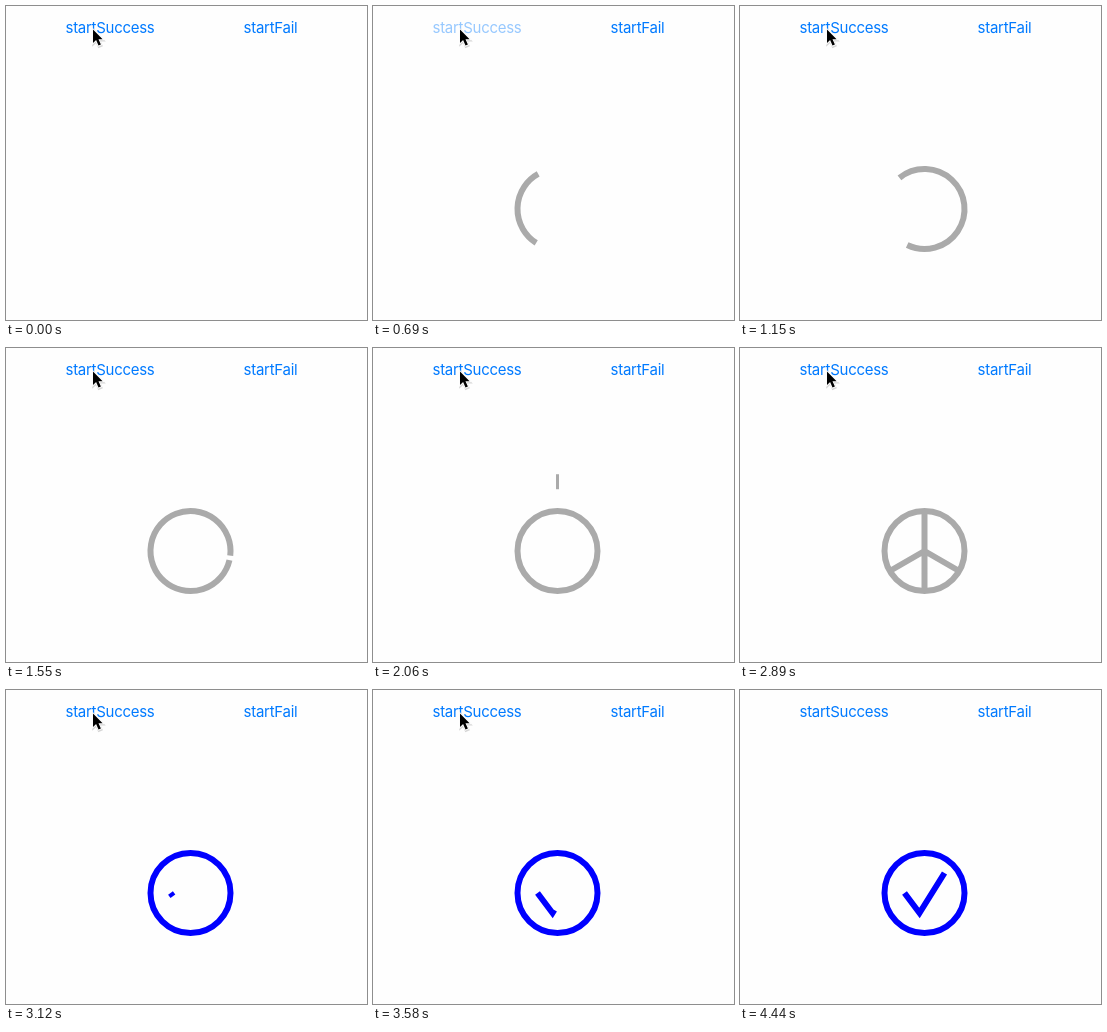
These frames come from a looping animation (361x314 px, 5.46 s). An HTML page:

```html
<!DOCTYPE html>
<html lang="en">
<head>
<meta charset="utf-8">
<title>Loading indicator</title>
<style>
  html, body { margin: 0; width: 100%; height: 100%; overflow: hidden; background: #fefefe; }
  svg { display: block; width: 361px; height: 314px; }
  text { font: 15px Inter, Roboto, sans-serif; letter-spacing: -.28px; fill: #007aff; text-anchor: middle; }
  .line { fill: none; stroke: #aaa; stroke-width: 6; }
  .thin { stroke-width: 3; }
  .blue { stroke: #00f; }
</style>
</head>
<body>
<svg viewBox="0 0 361 314">
  <text id="success" x="104" y="26.6">startSuccess</text>
  <text x="264.5" y="26.6">startFail</text>
  <path id="ring" class="line"/>
  <path id="mover" class="line thin"/>
  <path id="drop" class="line thin"/>
  <path id="spokes" class="line"/>
  <path id="check" class="line blue" stroke-miterlimit="10"/>
  <g id="cursor">
    <path d="M0 0V13.6L3.1 10.7L5.5 16.2L7.9 15.2L5.5 9.9H9.6Z" transform="translate(.4 1)"
      fill="none" stroke="#000" stroke-opacity=".16" stroke-width="2.4"/>
    <path d="M0 0V13.6L3.1 10.7L5.5 16.2L7.9 15.2L5.5 9.9H9.6Z"
      stroke="#fff" stroke-width="1.8" paint-order="stroke"/>
  </g>
</svg>
<script>
const LOOP = 5460, CX = 184.5, CY = 203, R = 40, BASE = CY + R + 3;

// Stage boundaries in ms
const PRESS = 510, RELEASE = 585, CLOSED = 1575, FALL = 2040, HIT = 2190,
      BOUNCE = 2440, ROUND = 2720, PEACE = 2880, DONE = 3010;

const $ = id => document.getElementById(id);
const mix = (a, b, p) => a + (b - a) * p;
const part = (t, a, b) => Math.min(1, Math.max(0, (t - a) / (b - a)));
const polar = (x, y, r, a) => `${x + r * Math.cos(a)} ${y + r * Math.sin(a)}`;
const vertical = (a, b) => b - a > .05 ? `M${CX} ${a}V${b}` : '';

// Counterclockwise arc from angle a down to angle b
function arc(x, y, r, a, b) {
  if (a - b > 2 * Math.PI - .01) return `M${x + r} ${y}a${r} ${r} 0 1 0 ${-2 * r} 0a${r} ${r} 0 1 0 ${2 * r} 0Z`;
  return `M${polar(x, y, r, a)}A${r} ${r} 0 ${a - b > Math.PI ? 1 : 0} 0 ${polar(x, y, r, b)}`;
}

function polyline(points, p) {
  const dist = (a, b) => Math.hypot(b[0] - a[0], b[1] - a[1]);
  let total = 0;
  for (let i = 1; i < points.length; i++) total += dist(points[i - 1], points[i]);
  let left = total * p, d = 'M' + points[0];
  for (let i = 1; i < points.length && left > 0; i++) {
    const a = points[i - 1], b = points[i], len = dist(a, b), q = Math.min(1, left / len);
    d += `L${mix(a[0], b[0], q)} ${mix(a[1], b[1], q)}`;
    left -= len;
  }
  return d;
}

function drawRing(t, squash) {
  const p = part(t, RELEASE, CLOSED), ring = $('ring');
  ring.setAttribute('d', t < RELEASE - 10 ? '' :
    arc(CX, CY, R, Math.PI * (3.5 - 1.5 * p), Math.PI * 3 * (1 - p)));
  ring.setAttribute('transform',
    `translate(${CX} ${BASE}) scale(${1 + .1 * squash} ${1 - .2 * squash}) translate(${-CX} ${-BASE})`);
  ring.classList.toggle('blue', t >= DONE);
}

// Short piece that flies off the ring to a point above it
function drawMover(t) {
  const p = part(t, CLOSED, FALL), sweep = Math.asin(.8);
  $('mover').setAttribute('d', t < CLOSED || t >= FALL ? '' :
    arc(CX - 1.5 * R, CY, 2.5 * R, -.9 * p * sweep, -(.1 + .9 * p) * sweep));
}

function drawDrop(t) {
  let d = '';
  if (t >= FALL && t < HIT) {
    const y = mix(123, 146, part(t, FALL, HIT));
    d = vertical(y, y + 15);
  } else if (t >= HIT && t < BOUNCE) {
    const p = part(t, HIT, BOUNCE);
    d = vertical(mix(146, CY, p), mix(161, CY, p));
  }
  $('drop').setAttribute('d', d);
}

function drawSpokes(t, squash) {
  let d = '';
  if (t >= HIT && t < DONE) {
    const top = BASE - (2 * R + 3) * (1 - .2 * squash), grow = R * part(t, BOUNCE, PEACE);
    d = vertical(top, mix(top, CY, part(t, HIT, BOUNCE)) + grow);
    if (grow) for (const a of [Math.PI / 6, Math.PI * 5 / 6]) d += `M${CX} ${CY}L${polar(CX, CY, grow, a)}`;
  }
  $('spokes').setAttribute('d', d);
}

function drawCheck(t) {
  const p = part(t, 3045, 4400);
  $('check').setAttribute('d', p ? polyline([[CX - 20, CY], [CX - 5, CY + 20], [CX + 20, CY - 20]], p) : '');
}

function draw(t) {
  const squash = part(t, HIT, BOUNCE) - part(t, BOUNCE, ROUND);
  $('success').setAttribute('opacity', t < PRESS ? 1 : mix(.2, 1, part(t, RELEASE, 1000)));
  drawRing(t, squash);
  drawMover(t);
  drawDrop(t);
  drawSpokes(t, squash);
  drawCheck(t);
  const lift = t < 3870 ? 0 : t < 3930 ? 1 : 6;
  $('cursor').setAttribute('transform', `translate(87 ${23.4 - lift})`);
  $('cursor').setAttribute('visibility', t < 3980 ? 'visible' : 'hidden');
}

const start = performance.now();
function tick() {
  draw((performance.now() - start) % LOOP);
  requestAnimationFrame(tick);
}
tick();
</script>
</body>
</html>
```
